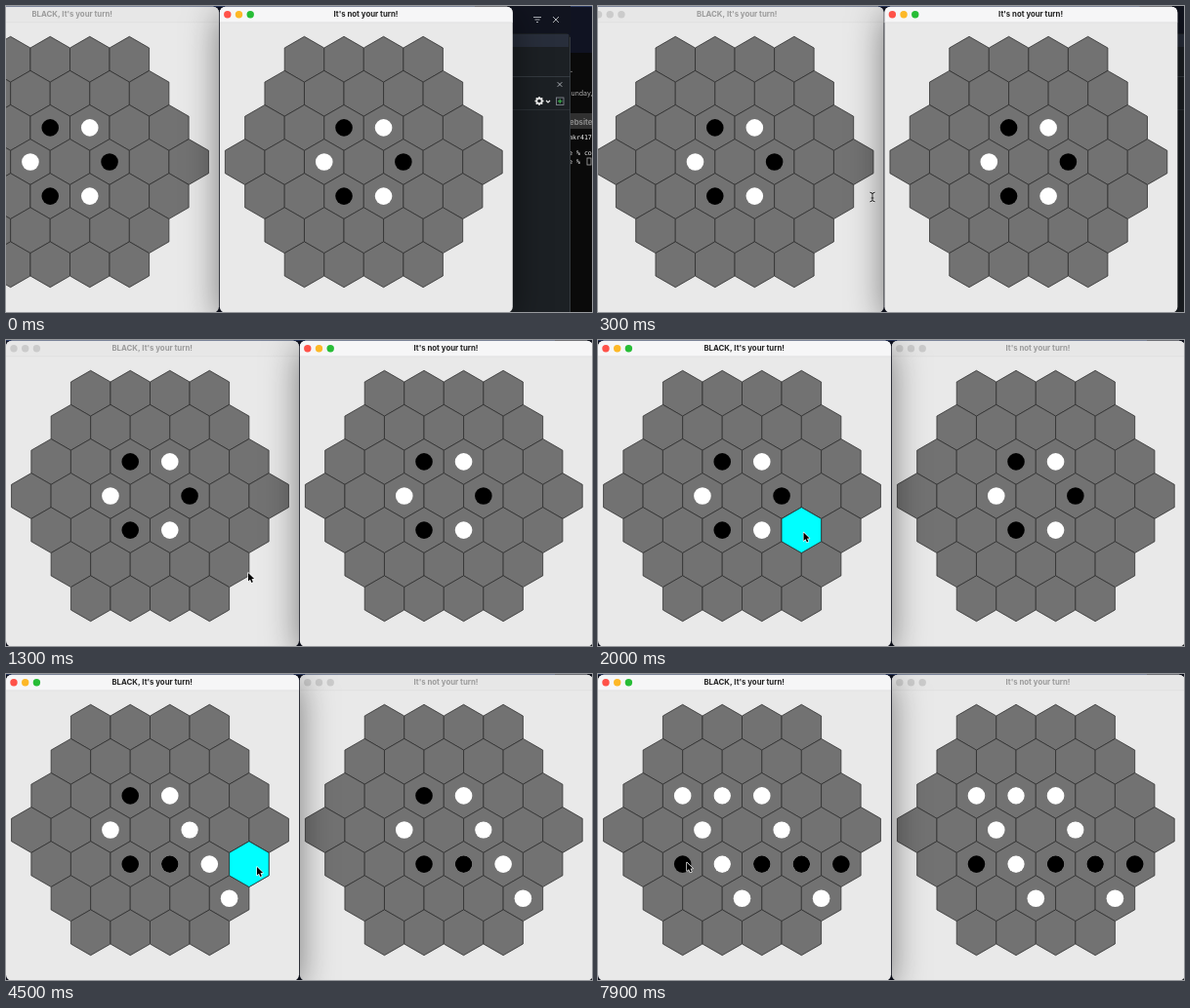
Recreate the animation shown at these times as an HTML page with a canvas. Size 600 by 314 pixels, loop 8000 ms.

```html
<!DOCTYPE html>
<html lang="en">
<head>
<meta charset="utf-8">
<title>Hex board game</title>
<style>
  html, body { margin: 0; width: 100%; height: 100%; overflow: hidden; background: #0b0e18; }
  canvas { display: block; }
</style>
</head>
<body>
<canvas id="stage" width="600" height="314"></canvas>
<script>
const ctx = document.getElementById('stage').getContext('2d');
const LOOP = 8000, STEP = 100;
const DX = 40.55, DY = 35.1, HEX = 23.4, SLIDE = 82;

// Cells are [half columns, rows] from the board centre.
const MOVES = [
  { at: 0, black: [[-1, -1], [2, 0], [-1, 1]], white: [[1, -1], [-2, 0], [1, 1]] },
  { at: 2200, black: [[1, 1]], white: [[4, 2], [3, 1], [2, 0]] },
  { at: 4700, black: [[5, 1], [3, 1]], white: [[0, 2], [1, 1], [-1, 1]] },
  { at: 6900, black: [[-3, 1], [1, 1]], white: [[-3, -1], [-1, -1]] }
];
const SELECTIONS = [
  { from: 1900, to: 2200, cell: [3, 1] },
  { from: 4400, to: 4700, cell: [5, 1] },
  { from: 6600, to: 6900, cell: [-3, 1] }
];
const LEFT_ACTIVE_AT = 1900;
// Pointer path: time, x, y
const POINTER = [
  [300, 281, 196], [900, 281, 196], [1300, 248, 239], [1800, 210.5, 197.5],
  [3600, 210.5, 197.5], [4300, 257, 198], [5600, 257, 198],
  [6100, 117, 223], [6500, 91, 193.5]
];

function rect(x, y, w, h, color) {
  ctx.fillStyle = color;
  ctx.fillRect(x, y, w, h);
}

function disc(x, y, r, color) {
  ctx.beginPath();
  ctx.arc(x, y, r, 0, Math.PI * 2);
  ctx.fillStyle = color;
  ctx.fill();
}

function lines(color, width, ...paths) {
  ctx.beginPath();
  for (const path of paths) path.forEach(([x, y], i) => i ? ctx.lineTo(x, y) : ctx.moveTo(x, y));
  ctx.strokeStyle = color;
  ctx.lineWidth = width;
  ctx.stroke();
}

function text(str, x, y, color, font, align = 'left') {
  ctx.font = font;
  ctx.textAlign = align;
  ctx.fillStyle = color;
  ctx.fillText(str, x, y);
}

function hexagon(x, y, fill) {
  ctx.beginPath();
  for (let i = 0; i < 6; i++) {
    const a = Math.PI / 6 + i * Math.PI / 3;
    ctx.lineTo(x + HEX * Math.cos(a), y + HEX * Math.sin(a));
  }
  ctx.closePath();
  ctx.fillStyle = fill;
  ctx.fill();
  ctx.strokeStyle = '#2b2b2b';
  ctx.lineWidth = 0.75;
  ctx.stroke();
}

function drawBoard(cx, t, selected) {
  const place = ([col, row]) => [cx + col * DX / 2, 160 + row * DY];
  for (let row = -3; row <= 3; row++) {
    const reach = 6 - Math.abs(row);
    for (let col = -reach; col <= reach; col += 2) hexagon(...place([col, row]), '#727272');
  }
  if (selected) hexagon(...place(selected), '#00ffff');
  for (const move of MOVES) {
    if (t < move.at) break;
    for (const cell of move.black) disc(...place(cell), 8.8, '#000');
    for (const cell of move.white) disc(...place(cell), 8.8, '#fff');
  }
}

function drawWindow(x, title, active, t, selected) {
  ctx.save();
  ctx.beginPath();
  ctx.roundRect(x, 0.7, 300, 314, 6);
  ctx.shadowColor = active ? 'rgba(0,0,0,.5)' : 'rgba(0,0,0,.3)';
  ctx.shadowBlur = active ? 36 : 16;
  ctx.shadowOffsetY = 8;
  ctx.fillStyle = '#e9e9e9';
  ctx.fill();
  ctx.shadowColor = 'transparent';
  ctx.clip();
  rect(x, 0, 300, 17, active ? '#f6f6f7' : '#e7e7e7');
  rect(x, 16.6, 300, 0.6, active ? '#d5d5d5' : '#dadada');
  const lights = active ? ['#ff5249', '#fdb827', '#27bd36'] : ['#cbcbcb', '#cbcbcb', '#cbcbcb'];
  lights.forEach((color, i) => disc(x + 8 + i * 11.7, 8.8, 3.7, color));
  text(title, x + 149.7, 10.6, active ? '#222' : '#9b9b9b', '700 7.8px Inter, sans-serif', 'center');
  drawBoard(x + 147.5, t, selected);
  ctx.restore();
}

function drawDesktop() {
  const mono = '6.6px "DejaVu Sans Mono", monospace';
  rect(-100, 0, 900, 314, '#101322');
  rect(-100, 0, 700, 1, '#27375f');
  // Terminal
  rect(577, 48, 160, 266, '#0a0a0a');
  text('-', 577, 69, '#ddd', mono);
  text('Sunday,', 574, 92, '#aaa', '7px Inter, sans-serif');
  rect(577, 110, 160, 16, '#303030');
  text('ebsite', 577, 122, '#8b8b8b', '700 7.8px Inter, sans-serif');
  text('mkr417', 576, 137, '#eee', mono);
  text('e % co', 576, 153, '#eee', mono);
  text('e %', 576, 162, '#eee', mono);
  ctx.strokeStyle = '#aaa';
  ctx.lineWidth = 0.8;
  ctx.strokeRect(595, 156, 4, 7);
  // Editor
  rect(480, 0, 98, 28, '#11141f');
  ctx.beginPath();
  ctx.roundRect(480, 28, 98, 300, 5);
  ctx.fillStyle = '#1c2024';
  ctx.fill();
  rect(480, 29, 96, 13, '#282e3b');
  rect(480, 72, 98, 1, '#343a40');
  rect(480, 106, 98, 1, '#2b3035');
  rect(577, 32, 0.8, 282, '#3c4147');
  const cross = (x, y, r) => lines('#a9adb3', 1, [[x - r, y - r], [x + r, y + r]], [[x + r, y - r], [x - r, y + r]]);
  cross(563, 14, 3);
  cross(567, 80.5, 2.3);
  lines('#a9adb3', 1, [[540, 11.5], [548, 11.5]], [[541.5, 14], [546.5, 14]], [[543, 16.5], [545, 16.5]]);
  for (let i = 0; i < 8; i++) {
    const a = i * Math.PI / 4;
    disc(546 + 3.6 * Math.cos(a), 97.5 + 3.6 * Math.sin(a), 1, '#eee');
  }
  disc(546, 97.5, 3.4, '#eee');
  disc(546, 97.5, 1.8, '#1c2024');
  lines('#eee', 1.2, [[553, 97], [555, 99], [557, 97]]);
  ctx.strokeStyle = '#8b9098';
  ctx.lineWidth = 0.8;
  ctx.strokeRect(563.5, 94, 7.5, 7.5);
  lines('#39b54a', 1.1, [[565, 97.7], [569.5, 97.7]], [[567.2, 95.5], [567.2, 100]]);
}

function pointerAt(t) {
  const next = POINTER.findIndex(p => p[0] > t);
  if (next < 0) return POINTER.at(-1).slice(1);
  const [t0, x0, y0] = POINTER[next - 1], [t1, x1, y1] = POINTER[next];
  const u = (t - t0) / (t1 - t0), k = u * u * (3 - 2 * u);
  return [x0 + (x1 - x0) * k, y0 + (y1 - y0) * k];
}

function drawPointer(t) {
  if (t < POINTER[0][0]) return;
  const [x, y] = pointerAt(t);
  if (t < 1000) {
    const beam = [
      [[x - 2.5, y - 5], [x, y - 3.5], [x + 2.5, y - 5]],
      [[x, y - 3.5], [x, y + 3.5]],
      [[x - 2.5, y + 5], [x, y + 3.5], [x + 2.5, y + 5]],
      [[x - 1.5, y + 1], [x + 1.5, y + 1]]
    ];
    lines('#fff', 2.2, ...beam);
    lines('#222', 1.1, ...beam);
    return;
  }
  const arrow = [[0, 0], [0, 8.6], [2, 6.8], [3.4, 10], [4.9, 9.3], [3.5, 6.2], [6.1, 6.1]];
  ctx.beginPath();
  for (const [dx, dy] of arrow) ctx.lineTo(x + dx, y + dy);
  ctx.closePath();
  ctx.lineJoin = 'round';
  ctx.strokeStyle = '#fff';
  ctx.lineWidth = 1.3;
  ctx.stroke();
  ctx.fillStyle = '#000';
  ctx.fill();
}

function draw(t) {
  const slide = SLIDE * Math.exp(-t / 125);
  const leftActive = t >= LEFT_ACTIVE_AT;
  const selected = SELECTIONS.find(s => t >= s.from && t < s.to)?.cell;
  const left = () => drawWindow(0, "BLACK, It's your turn!", leftActive, t, selected);
  const right = () => drawWindow(300.8, "It's not your turn!", !leftActive, t);

  rect(0, 0, 600, 314, '#0b0e18');
  ctx.save();
  ctx.translate(-slide, 0);
  ctx.save();
  ctx.translate(SLIDE, 0);
  drawDesktop();
  ctx.restore();
  if (leftActive) { right(); left(); } else { left(); right(); }
  ctx.restore();
  drawPointer(t);
}

const start = performance.now();
function tick() {
  const t = (performance.now() - start) % LOOP;
  draw(Math.floor(t / STEP) * STEP);
  requestAnimationFrame(tick);
}
tick();
</script>
</body>
</html>
```
